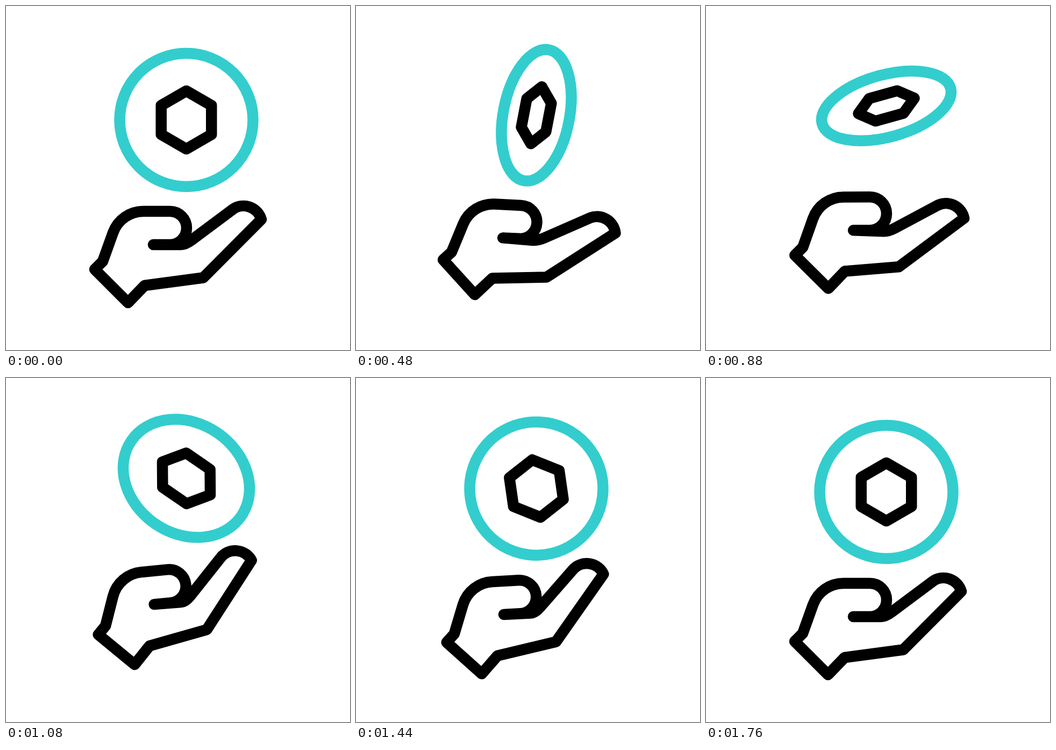
An HTML page for the animation above (1960 ms loop, 640 by 640 pixels).

```html
<!DOCTYPE html>
<html lang="en">
<head>
<meta charset="utf-8">
<title>Coin toss</title>
<style>
  html, body { margin: 0; width: 100%; height: 100%; overflow: hidden; background: #fff; }
  svg { display: block; width: 100%; height: 100%; }
  svg * { fill: none; stroke: #000; stroke-width: 20.5; stroke-linejoin: round; stroke-linecap: round; }
  #ring { stroke: #33cdcd; }
</style>
</head>
<body>
<svg viewBox="0 0 640 640">
  <g id="coin">
    <polygon id="hex"/>
    <ellipse id="ring" ry="124"/>
  </g>
  <path id="hand"/>
</svg>
<script>
const LOOP = 1960, STEP = 40, START = 140, END = 1740;
const [coin, hex, ring, hand] = ['coin', 'hex', 'ring', 'hand'].map(id => document.getElementById(id));

const mix = (a, b, k) => a + (b - a) * k;

// Bezier ease with horizontal handles of length a (leaving) and b (arriving).
const ease = (a, b) => x => {
  let lo = 0, hi = 1, p;
  for (let i = 0; i < 24; i++) {
    p = (lo + hi) / 2;
    const q = 1 - p;
    if (3 * a * p * q * q + 3 * (1 - b) * p * p * q + p ** 3 < x) lo = p; else hi = p;
  }
  return p * p * (3 - 2 * p);
};
const smooth = ease(.57, .57), settle = ease(.46, .31), tumble = ease(.12, .335);

// Value at t along [time, value, ease into it] keys.
function track(t, ...keys) {
  const i = keys.findIndex(k => k[0] > t);
  if (i === 0) return keys[0][1];
  if (i < 0) return keys[keys.length - 1][1];
  const [t0, v0] = keys[i - 1], [t1, v1, curve = smooth] = keys[i];
  return mix(v0, v1, curve((t - t0) / (t1 - t0)));
}

// Finger poses relative to the thumb end: knuckle, tip, joint, crease.
const rest = [93, 61.5, 201, -47, 147, -65, 60, 0];
const low = [82, 71.7, 211.3, -9.5, 164.5, -37.8, 67.5, 3];
const high = [94.5, 53.9, 184.6, -72, 126.8, -80.1, 57.4, .5];
const poses = [rest, low, high, rest, rest];

function handPath(phase) {
  const i = Math.floor(phase);
  const [kx, ky, tx, ty, jx, jy, cx, cy] = poses[i].map((v, n) => mix(v, poses[i + 1][n], phase - i));
  return `M-109 46L-47 108L-16 76L${kx} ${ky}L${tx} ${ty}A34.5 34.5 0 0 0 ${jx} ${jy}`
    + `L${mix(cx, jx, .13)} ${mix(cy, jy, .13)}Q${cx} ${cy} ${cx * .86} ${cy * .86}`
    + 'L0 0H31A31 31 0 0 0 31 -62H-18C-43 -62 -66 -47 -75 -22L-94 31Z';
}

function hexPoints(scale) {
  return Array.from({ length: 6 }, (_, i) => {
    const a = i * Math.PI / 3;
    return `${54 * scale * Math.sin(a)},${-54 * Math.cos(a)}`;
  }).join(' ');
}

function draw(t) {
  const spin = track(t, [START, 0], [END, 180]);
  const coinY = track(t, [START, 212], [(START + END) / 2, 185.7], [END, 212]);
  const scale = Math.max(.008, Math.abs(track(t, [235, 1], [1290, -1, tumble])));
  coin.setAttribute('transform', `translate(335.5 ${coinY}) rotate(${spin})`);
  ring.setAttribute('rx', 124 * scale);
  hex.setAttribute('points', hexPoints(scale));

  const handY = track(t, [START, 444], [775, 417, settle], [END, 444]);
  const tilt = track(t, [START, 0], [650, 3.3], [1160, -5.8], [END, 0]);
  const phase = t < 690 ? track(t, [START, 0], [690, 1])
    : track(t, [690, 1], [1240, 2], [END, 3]);
  hand.setAttribute('transform', `translate(274 ${handY}) rotate(${tilt} 0 -18)`);
  hand.setAttribute('d', handPath(phase));
}

const start = performance.now();
function tick() {
  const t = Math.max(0, performance.now() - start) % LOOP;
  draw(Math.floor(t / STEP) * STEP);
  requestAnimationFrame(tick);
}
tick();
</script>
</body>
</html>
```
